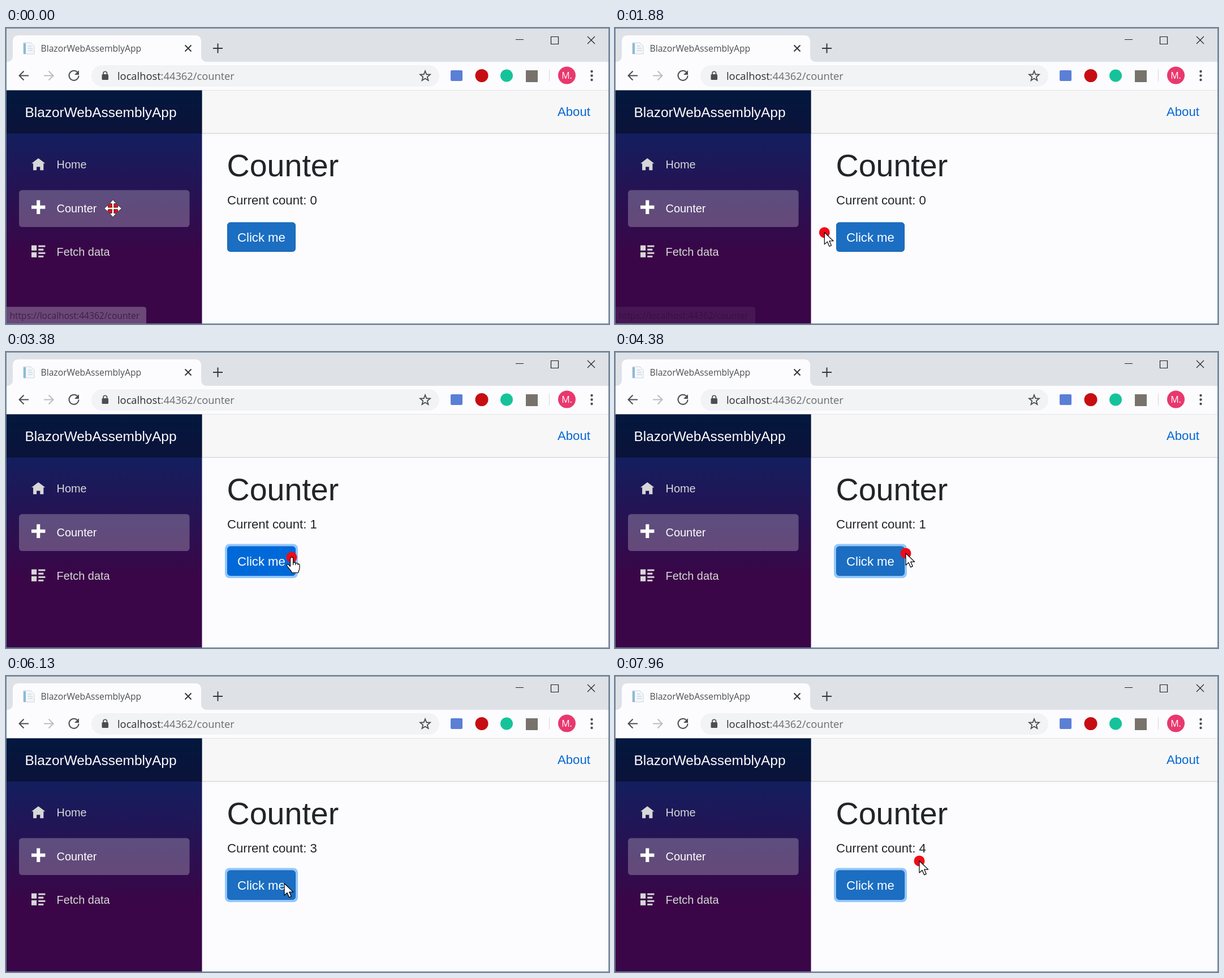
Animation of 1066 by 525 pixels, one loop 8 s. Source, as an HTML page:

```html
<!DOCTYPE html>
<html lang="en">
<head>
<meta charset="utf-8">
<title>Counter</title>
<style>
html, body { margin: 0; width: 100%; height: 100%; overflow: hidden; }
svg { display: block; width: 1066px; height: 525px; }
text { white-space: pre; }
.page { font: 22.15px "Liberation Sans", Arial, sans-serif; fill: #212529; }
.nav { font-size: 19.9px; fill: #d7d7d7; }
.nav .active { fill: #fff; }
.chrome { font-family: "Open Sans", "Noto Sans", sans-serif; fill: #4b4e52; }
.line { fill: none; stroke: #4b4e52; stroke-width: 2; }
.cursor { fill: #fff; stroke: #000; stroke-width: 1.2; stroke-linejoin: round; }
</style>
</head>
<body>
<svg viewBox="0 0 1066 525">
  <defs>
    <linearGradient id="night" x2="0" y2="1">
      <stop stop-color="#052767"/>
      <stop offset=".7" stop-color="#3a0647"/>
    </linearGradient>
    <path id="arm" d="M-1.800 0V-8.500H-6L0-15.500L6-8.500H1.800V0"/>
  </defs>
  <rect width="1066" height="525" fill="#fcfcfe"/>

  <!-- Browser window -->
  <g class="chrome">
    <rect width="1066" height="60" fill="#dee1e6"/>
    <path d="M1 60Q12 60 12 49V24Q12 13 23 13H334Q345 13 345 24V49Q345 60 356 60Z" fill="#fcfcfe"/>
    <path d="M31 26H44L50 32V46H31Z" fill="#f4f7fa" stroke="#c9d5de"/>
    <path d="M31 27h4v19h-4z" fill="#8db9d8"/>
    <path d="M39 32h6M39 36h8M39 40h8" stroke="#b5c9d6"/>
    <text x="61.500" y="41.500" font-size="15.7">BlazorWebAssemblyApp</text>
    <path class="line" d="M316.500 30.500l11 11m0-11l-11 11M366 36h17M374.500 27.500v17" style="stroke:#33373b"/>
    <path class="line" d="M901 20.500h14M963.500 15.500h13v13h-13zM1028 15l13 13m0-13l-13 13" style="stroke:#222;stroke-width:1.2"/>
    <path class="line" d="M40 84.500H24M31.500 76.500l-8 8 8 8M127 79.500a8.500 8.500 0 1 0 1.500 5"/>
    <path d="M129 75v8h-8z"/>
    <path class="line" d="M67 84.500H83M75.500 76.500l8 8-8 8" style="stroke:#b9bcc0"/>
    <rect x="151" y="66" width="615" height="38" rx="19" fill="#f1f3f4"/>
    <rect x="169.500" y="82" width="11.500" height="10" rx="1.500"/>
    <path class="line" d="M172 83v-2.500a3.250 3.250 0 0 1 6.500 0V83" style="stroke-width:1.700"/>
    <text x="197" y="92" font-size="18.3"><tspan fill="#2b2e32">localhost</tspan><tspan fill="#686b70">:44362/counter</tspan></text>
    <path class="line" id="star" style="stroke-width:1.800"/>
    <rect x="786" y="75" width="21" height="19" rx="2" fill="#5b7fd6"/>
    <circle cx="841" cy="84.500" r="11.500" fill="#c70d12"/>
    <circle cx="885" cy="84.500" r="11" fill="#15c39a"/>
    <rect x="919" y="75" width="21" height="21" fill="#77736c"/>
    <path d="M960.500 74v21" stroke="#d3d5d8"/>
    <circle cx="991.500" cy="84" r="15.500" fill="#e8386e"/>
    <text x="991.500" y="90" font-size="16" text-anchor="middle" style="fill:#fff">M.</text>
    <circle cx="1035.500" cy="77" r="2.200"/><circle cx="1035.500" cy="84.500" r="2.200"/><circle cx="1035.500" cy="92" r="2.200"/>
  </g>

  <!-- Web page -->
  <g class="page">
    <rect x="346" y="110" width="720" height="77" fill="#f7f7f7"/>
    <path d="M346 187h720" stroke="#c9c9c8"/>
    <path d="M346 110.500h720" stroke="#e3e4e4"/>
    <text x="975" y="155.500" fill="#0366d6">About</text>
    <rect y="110.500" width="346.500" height="414.500" fill="url(#night)"/>
    <rect y="110.500" width="346.500" height="76.500" fill-opacity=".4" fill="#000"/>
    <text x="33.500" y="157.500" font-size="24.4" fill="#fff">BlazorWebAssemblyApp</text>
    <g class="nav">
      <rect id="item" x="23" y="287.500" width="301.500" height="65.500" rx="5.500" fill="#fff"/>
      <path transform="translate(45 231)scale(3.05)" d="M4 0l-4 3h1v4h2v-2h2v2h2v-4h1z"/>
      <text x="89.600" y="249">Home</text>
      <path class="active" transform="translate(45 305.500)scale(3.05)" d="M3 0v3h-3v2h3v3h2v-3h3v-2h-3v-3z"/>
      <text class="active" x="89.600" y="326.500">Counter</text>
      <path transform="translate(45 385.500)scale(3.05)" d="M0 0h3v3h-3zM4 0h4v1h-4zM4 2h3v1h-3zM0 4h3v3h-3zM4 4h4v1h-4zM4 6h3v1h-3z"/>
      <text x="89.600" y="404">Fetch data</text>
    </g>
    <text x="390.500" y="262.800" font-size="55.6">Counter</text>
    <text x="391" y="313">Current count: <tspan id="count">0</tspan></text>
    <rect id="ring" x="387" y="340.500" width="129" height="60.500" rx="8" fill="#92c7ff"/>
    <rect id="button" x="391.500" y="345" width="120" height="51.500" rx="5"/>
    <text x="409" y="378.500" fill="#fff">Click me</text>
  </g>

  <g id="status" class="chrome">
    <path d="M0 494.500H243Q248 494.500 248 499.500V525H0Z" fill="#dee1e6"/>
    <text x="6.500" y="515.500" font-size="15.6">https://localhost:44362/counter</text>
  </g>
  <rect x=".5" y=".5" width="1065" height="524" fill="none" stroke="#5b83a6"/>

  <g id="mouse">
    <circle id="dot" r="9.500" fill="#ee0c18"/>
    <g class="cursor">
      <g id="cross" stroke-width=".7" style="stroke-width:.7">
        <use href="#arm"/><use href="#arm" transform="rotate(90)"/>
        <use href="#arm" transform="rotate(180)"/><use href="#arm" transform="rotate(270)"/>
        <path d="M-1.800 -1.800h3.600v3.600h-3.600z" stroke="none"/>
      </g>
      <path id="hand" d="M-2.500 2.500a2.600 2.600 0 0 1 5.200 0v7.500c1-1 4-.6 4.300 1 1-1 3.600-.6 4 1 1-.8 3 0 3 2v5c0 4-2 5-2.500 8.500h-11c-.5-3-6-8-9-12.500-.8-2 1.600-3 3.200-1.600l2.800 3zM2.700 10v4M7 11v3M11 12v2"/>
      <path id="arrow" d="M0 0V21l5-4.600 3.600 8.200 3.600-1.500-3.500-8h7z"/>
    </g>
  </g>
</svg>
<script>
const LOOP = 8000;
const $ = id => document.getElementById(id);

// Mouse stops: time, x, y
const path = [
  [0, 189, 320], [210, 189, 320], [500, 208, 325], [1050, 211.5, 326], [1450, 212, 326],
  [2200, 471, 386], [2750, 472, 384], [3050, 530, 350], [3340, 505, 364], [3520, 505, 364],
  [3850, 530, 350], [4250, 514, 357], [4500, 514, 357], [4720, 500, 365], [4900, 500, 365],
  [5150, 528, 350], [5450, 502, 366], [5700, 502, 366], [5880, 520, 355], [6080, 492, 368],
  [6600, 494, 368], [7000, 520, 350], [7600, 534, 334], [7900, 538, 328], [LOOP, 538, 328]
];
const clicks = [2650, 4850, 5620, 6500];

const clamp = v => Math.max(0, Math.min(1, v));
const ramp = (t, from, to) => clamp((t - from) / (to - from));
const show = (id, on) => $(id).style.display = on ? "" : "none";

function mouseAt(t) {
  const next = path.findIndex(stop => stop[0] > t);
  const [t0, x0, y0] = path[next - 1], [t1, x1, y1] = path[next];
  const k = ramp(t, t0, t1), ease = k * k * (3 - 2 * k);
  return [x0 + (x1 - x0) * ease, y0 + (y1 - y0) * ease];
}

$("star").setAttribute("d", "M" + Array.from({ length: 10 }, (_, i) => {
  const r = i % 2 ? 4 : 9.3, a = i * Math.PI / 5;
  return [741 + r * Math.sin(a), 85.5 - r * Math.cos(a)];
}).join("L") + "Z");

function draw(now) {
  const t = now % LOOP;
  const [x, y] = mouseAt(t);
  const count = clicks.filter(c => c <= t).length;
  const loading = t < 210, resting = t >= 6000 && t < 6250;
  const overItem = !loading && x < 325;
  const overButton = !resting && x > 391 && x < 512 && y > 345 && y < 397;

  $("mouse").setAttribute("transform", `translate(${x} ${y})`);
  show("cross", loading);
  show("hand", overItem || overButton);
  show("arrow", !loading && !overItem && !overButton);
  show("dot", !resting);

  $("item").setAttribute("fill-opacity", overItem ? .1 : .25);
  $("status").setAttribute("opacity", .3 + .7 * ramp(t, 210, 420) - ramp(t, 1650, 1900));
  $("count").textContent = count;
  show("ring", count);
  $("button").setAttribute("fill", overButton ? "#0069d9" : "#1b6ec2");
  $("button").setAttribute("stroke", overButton ? "#0062cc" : "#1861ac");
  requestAnimationFrame(draw);
}
requestAnimationFrame(draw);
</script>
</body>
</html>
```
